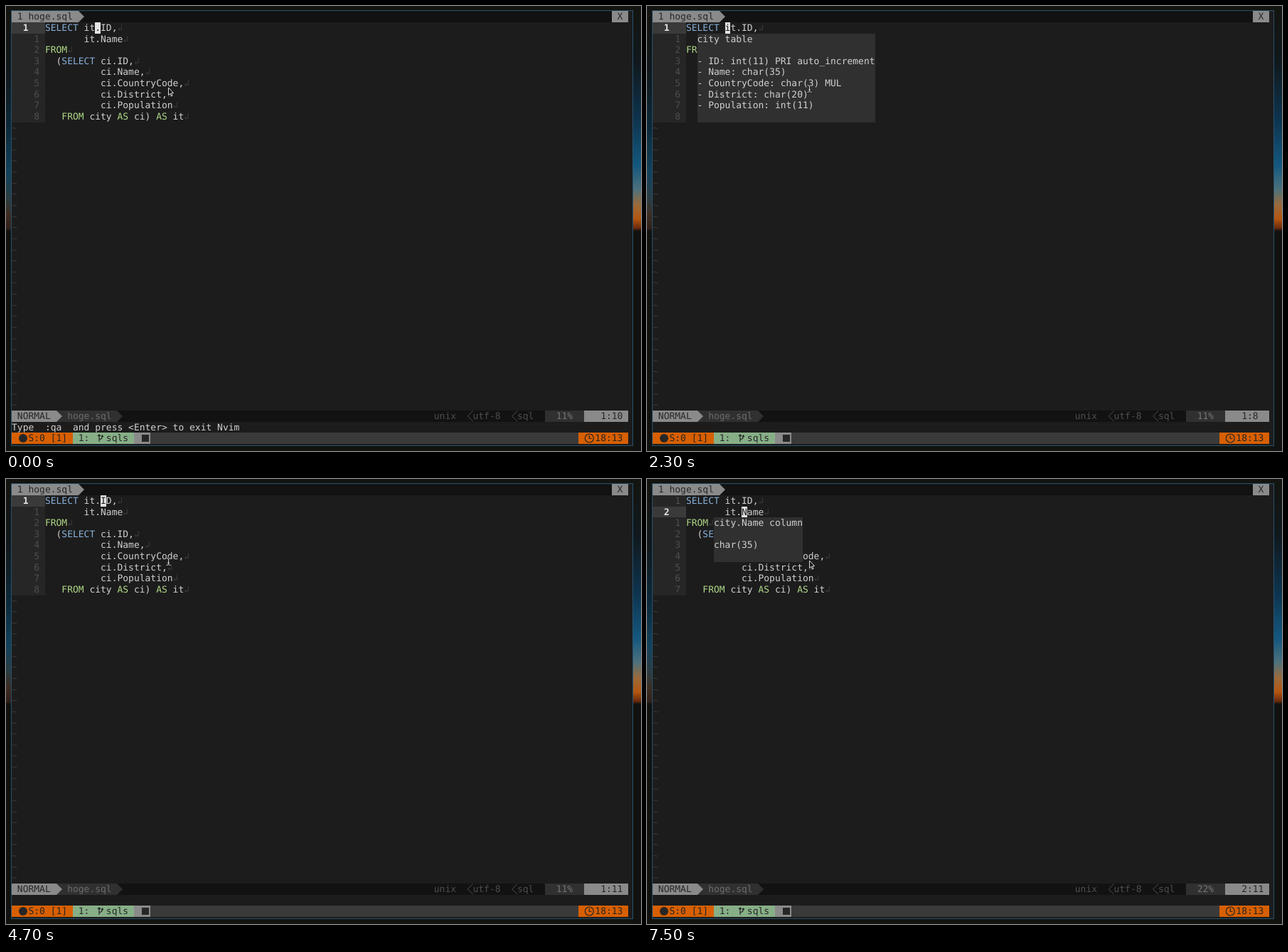
Recreate the animation shown at these times as an HTML page with a canvas. Size 893 by 627 pixels, loop 8000 ms.

```html
<!DOCTYPE html>
<html lang="en">
<head>
<meta charset="utf-8">
<title>SQL hover in a terminal editor</title>
<style>
  html, body { margin: 0; width: 100%; height: 100%; overflow: hidden; background: #13140f; }
  canvas { display: block; }
</style>
</head>
<body>
<canvas id="stage" width="893" height="627"></canvas>
<script>
const ctx = document.getElementById('stage').getContext('2d');
const LOOP = 8000, COLS = 111;
const FONT = '12.98px "DejaVu Sans Mono", monospace';
const BG = '#1c1c1c', BAR = '#121212', PANEL = '#303030', GREY = '#8a8a8a', INK = '#262626',
      TEXT = '#d0d0d0', DIM = '#4e4e4e', FAINT = '#3a3a3a', ORANGE = '#d75f00', GREEN = '#87af87';
const KEYWORDS = { SELECT: '#87afd7', FROM: '#afd787', AS: '#afd787' };

const CODE = [
  'SELECT it.ID,',
  '       it.Name',
  'FROM',
  '  (SELECT ci.ID,',
  '          ci.Name,',
  '          ci.CountryCode,',
  '          ci.District,',
  '          ci.Population',
  '   FROM city AS ci) AS it',
];

const TABLE_HOVER = { col: 8, row: 2, width: 32, height: 8, lines: [
  'city table', '', '- ID: int(11) PRI auto_increment', '- Name: char(35)',
  '- CountryCode: char(3) MUL', '- District: char(20)', '- Population: int(11)'] };
const ID_HOVER = { col: 11, row: 2, width: 26, height: 4,
  lines: ['city.ID column', '', 'int(11) PRI auto_increment'] };
const NAME_HOVER = { col: 11, row: 3, width: 16, height: 4,
  lines: ['city.Name column', '', 'char(35)'] };

// Each entry changes part of the state from its time (ms) on.
const EVENTS = [
  [0, { line: 1, column: 10, beam: false, popup: null, message: true }],
  [200, { beam: true }],
  [500, { column: 8, beam: false }],
  [600, { column: 1 }],
  [1300, { column: 8 }],
  [2100, { beam: true }],
  [2300, { popup: TABLE_HOVER, message: false }],
  [2800, { beam: false }],
  [4200, { column: 9, popup: null }],
  [4400, { column: 10 }],
  [4500, { column: 11 }],
  [4700, { beam: true }],
  [4900, { popup: ID_HOVER }],
  [5000, { beam: false }],
  [6900, { line: 2, popup: null }],
  [7200, { beam: true }],
  [7400, { popup: NAME_HOVER }],
  [7500, { beam: false }],
];

const cellX = col => 8 + col * 7.8125;
const cellY = row => 7.4 + row * 15.63;

function fillCells(col, row, width, height, color) {
  const x = Math.round(cellX(col)), y = Math.round(cellY(row));
  ctx.fillStyle = color;
  ctx.fillRect(x, y, Math.round(cellX(col + width)) - x, Math.round(cellY(row + height)) - y);
}

function write(col, row, text, color = TEXT, bold = false) {
  ctx.font = (bold ? 'bold ' : '') + FONT;
  ctx.fillStyle = color;
  [...text].forEach((char, i) => {
    if (char !== ' ') ctx.fillText(char, cellX(col + i), cellY(row) + 11.9);
  });
}

function polygon(points, fill, stroke) {
  ctx.beginPath();
  points.forEach(([x, y]) => ctx.lineTo(x, y));
  ctx.closePath();
  if (fill) { ctx.fillStyle = fill; ctx.fill(); }
  if (stroke) { ctx.strokeStyle = stroke; ctx.lineWidth = 1; ctx.stroke(); }
}

function strokePath(path, color, width = 1) {
  ctx.strokeStyle = color;
  ctx.lineWidth = width;
  ctx.stroke(new Path2D(path));
}

function separator(col, row, color) {
  const x = Math.round(cellX(col)), top = Math.round(cellY(row)), bottom = Math.round(cellY(row + 1));
  polygon([[x, top], [x + 8, (top + bottom) / 2], [x, bottom]], color);
}

function chevron(col, row) {
  const x = cellX(col), y = cellY(row);
  strokePath(`M${x + 8} ${y + .5}L${x + .5} ${y + 7.8}L${x + 8} ${y + 15}`, DIM);
}

function wallpaperStrip(x, width, stops) {
  const gradient = ctx.createLinearGradient(0, 0, 0, 627);
  stops.forEach(([y, color]) => gradient.addColorStop(y / 627, color));
  ctx.fillStyle = gradient;
  ctx.fillRect(x, 0, width, 627);
}

function drawWindow() {
  ctx.fillStyle = '#13140f';
  ctx.fillRect(0, 0, 893, 627);
  wallpaperStrip(0, 8, [[0, '#13140f'], [90, '#10171a'], [170, '#0c2838'], [235, '#12425c'],
    [270, '#2a3d44'], [295, '#3d2c20'], [314, '#30201a'], [317, '#11120f'], [627, '#11120f']]);
  wallpaperStrip(882, 11, [[0, '#13140f'], [80, '#10191e'], [160, '#0d344e'], [225, '#14587f'],
    [258, '#4d717c'], [280, '#9a6a3c'], [300, '#b4560f'], [313, '#6b2a0c'], [317, '#11120f'], [627, '#11120f']]);
  ctx.fillStyle = BG;
  ctx.fillRect(7, 6, 875, 614);
  ctx.strokeStyle = '#29516c';
  ctx.lineWidth = 1;
  ctx.strokeRect(7.5, 6.5, 874, 613);
}

function drawTabLine() {
  fillCells(0, 0, COLS, 1, BAR);
  fillCells(0, 0, 12, 1, GREY);
  separator(12, 0, GREY);
  write(1, 0, '1 hoge.sql', INK);
  fillCells(108, 0, 3, 1, GREY);
  write(109, 0, 'X', INK);
}

function drawCode({ line, column }) {
  fillCells(0, 1, 6, CODE.length, INK);
  fillCells(0, line, 6, 1, FAINT);
  CODE.forEach((source, i) => {
    const row = i + 1;
    if (row === line) write(2, row, String(line), '#e4e4e4', true);
    else write(4, row, String(Math.abs(row - line)), DIM);
    for (const { 0: token, index } of source.matchAll(/\w+|[^\w\s]+/g))
      write(6 + index, row, token, KEYWORDS[token]);
    write(6 + source.length, row, '↲', FAINT);
  });
  for (let row = CODE.length + 1; row < 36; row++) write(0, row, '~', FAINT);

  fillCells(5 + column, line, 1, 1, '#e4e4e4');
  write(5 + column, line, CODE[line - 1][column - 1], BG);
}

function drawPopup({ col, row, width, height, lines }) {
  fillCells(col, row, width, height, PANEL);
  lines.forEach((text, i) => write(col, row + i, text));
}

function drawStatusLine({ line, column }) {
  const row = 36;
  fillCells(0, row, COLS, 1, BAR);
  fillCells(0, row, 19, 1, PANEL);
  fillCells(0, row, 8, 1, GREY);
  separator(8, row, GREY);
  separator(19, row, PANEL);
  write(1, row, 'NORMAL', INK);
  write(10, row, 'hoge.sql', '#6c6c6c');
  write(76, row, 'unix', DIM);
  chevron(82, row);
  write(83, row, 'utf-8', DIM);
  chevron(90, row);
  write(91, row, 'sql', DIM);
  fillCells(96, row, 7, 1, PANEL);
  write(98, row, Math.floor(line / CODE.length * 100) + '%', '#767676');
  fillCells(103, row, 8, 1, GREY);
  write(106, row, `${line}:${column}`, INK);
}

function drawSessionBar() {
  const row = 38;
  fillCells(0, row, COLS, 1, FAINT);
  fillCells(0, row, 11, 1, ORANGE);
  fillCells(11, row, 11, 1, GREEN);
  fillCells(22, row, 3, 1, GREY);
  fillCells(102, row, 9, 1, ORANGE);
  write(3, row, 'S:0 [1]', INK);
  write(12, row, '1:', INK);
  write(17, row, 'sqls', INK);
  write(105, row, '18:13', INK);

  // Plain shapes for the system and editor badges.
  ctx.fillStyle = INK;
  ctx.beginPath();
  ctx.arc(24, 609, 6, 0, 2 * Math.PI);
  ctx.fill();
  ctx.fillRect(191, 604, 10, 10);

  strokePath('M131 604V614M131 611Q135.5 610 135.5 606M129 606L131 604L133 606M134 607L135.5 605L137 607', INK, 1.2);
  strokePath('M826.3 609A6 6 0 1 1 814.3 609A6 6 0 1 1 826.3 609M820.3 605V609.5H823.5', INK, 1.2);
}

function drawPointer(beam) {
  if (beam) {
    const path = 'M225.5 111.5Q228.5 111.5 228.5 113.5Q228.5 111.5 231.5 111.5M228.5 113V120' +
                 'M225.5 121.5Q228.5 121.5 228.5 119.5Q228.5 121.5 231.5 121.5M227 118H230';
    strokePath(path, BG, 2.4);
    strokePath(path, TEXT);
  } else {
    polygon([[228.5, 115], [228.5, 125.5], [231, 123.2], [232.5, 127], [234, 126.3],
             [232.5, 122.8], [235.5, 122.5]], '#111', '#dcdcdc');
  }
}

function stateAt(time) {
  return Object.assign({}, ...EVENTS.filter(([start]) => start <= time).map(([, change]) => change));
}

function render(state) {
  ctx.textRendering = 'geometricPrecision';
  drawWindow();
  drawTabLine();
  drawCode(state);
  if (state.popup) drawPopup(state.popup);
  drawStatusLine(state);
  if (state.message) write(0, 37, 'Type  :qa  and press <Enter> to exit Nvim');
  drawSessionBar();
  drawPointer(state.beam);
}

const begin = performance.now();
function tick() {
  render(stateAt((performance.now() - begin) % LOOP));
  requestAnimationFrame(tick);
}
tick();
</script>
</body>
</html>
```
